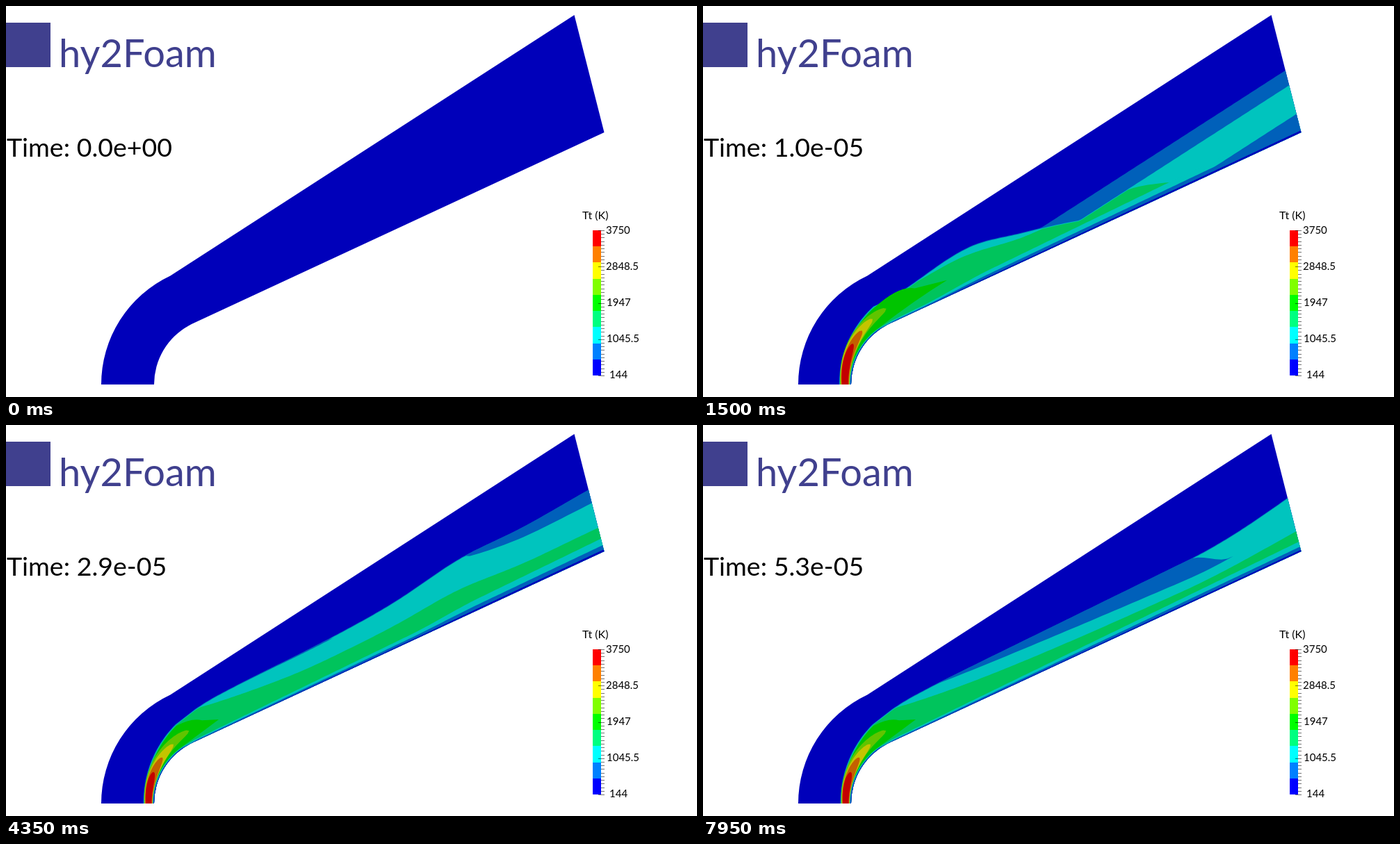
These frames come from a looping animation (994 px wide and 563 px high, 8 s). An HTML page with a canvas:

```html
<!DOCTYPE html>
<html lang="en">
<head>
<meta charset="utf-8">
<title>Flow over a blunt cone</title>
<style>
html, body { margin: 0; width: 100%; height: 100%; overflow: hidden; background: #fff; }
canvas, svg { position: absolute; left: 0; top: 0; width: 994px; height: 563px; }
text { font-family: Lato, "Open Sans", sans-serif; fill: #000; }
</style>
</head>
<body>
<canvas id="field" width="994" height="563"></canvas>
<svg viewBox="0 0 994 563">
  <rect x="0" y="24" width="64" height="64" fill="#40408e"/>
  <text x="76" y="88" font-size="56" style="fill:#40408e">hy2Foam</text>
  <text id="clock" x="1" y="217" font-size="37.5">Time: 0.0e+00</text>
  <text x="829" y="307" font-size="16">Tt (K)</text>
  <g id="legend" font-size="15"></g>
</svg>
<script>
const ctx = document.getElementById('field').getContext('2d');
const clock = document.getElementById('clock');
const STEP = 150, LOOP = 8000;
const DARK = '#0000ba', BLUE = '#0060ba', CYAN = '#00c4be', TEAL = '#00c45c', GREEN = '#00c400';

// Body geometry: concentric nose arcs, then straight flanks
const CX = 310, CY = 545, R_OUT = 173, R_IN = 97;
const rad = d => d * Math.PI / 180;
const polar = (r, deg) => [CX - r * Math.cos(rad(deg)), CY - r * Math.sin(rad(deg))];
const wallY = x => 460 - 0.4657 * (x - 263);
const above = (x, h) => [x, wallY(x) - h];
const mix = (a, b, f) => a + (b - a) * f;
const clamp = v => Math.max(0, Math.min(1, v));
function smooth(v, from, to) {
  const u = clamp((v - from) / (to - from));
  return u * u * (3 - 2 * u);
}

// Contour heights above the flank at step k
function flow(k) {
  const late = Math.max(k, 6) - 6;
  const growth = k < 6 ? 0.7 * k / 6 : mix(0.7, 1, clamp(late / 8));

  // Starting shock: the inflow boundary carried downstream
  const beam = x => wallY(x) - (388 - 0.645 * (x - 236 - 14.4 * k));
  // Slow front that thins the layer behind it
  const front = 465 + 12 * (k - 29);
  const ahead = x => smooth(x, front - 60, front + 200);
  // Wave packet drifting along the layer
  const wave = x => {
    const d = x - 430 - 15 * (k - 14);
    return 10 * Math.cos(d / 38) * Math.exp(-((d / 130) ** 2) - Math.abs(k - 14) / 12);
  };

  const layer = x => growth * (1 - smooth(x, 280 + 25 * late, 340 + 78 * late)) *
    (53 - 8 * Math.exp((263 - x) / 25) + (x - 300) * (0.025 + 0.06 * ahead(x)) + 1.2 * wave(x));
  const outer = x => Math.max(beam(x), layer(x));
  const warm = x => Math.max(beam(x) - 2.5 * k, layer(x) - 1);
  const hot = x => Math.min(warm(x) - 1,
    growth * (1 - smooth(x, 280 + 80 * late, 340 + 100 * late)) *
    (20 + 25 * Math.exp((285 - x) / 150) + 17 * ahead(x) + wave(x)));

  const ripple = 410 + 14 * (k - 14);
  const hotBase = x => 3 + 0.021 * (x - 275) + 5 * smooth(x, ripple - 40, ripple + 60);
  const warmBase = x => Math.max(0.48 * hotBase(x), beam(x) - 7.3 * k);
  const coolBase = x => Math.max(0.14 * hotBase(x), beam(x) - 10.5 * k);
  return { outer, warm, hot, hotBase, warmBase, coolBase };
}

function fill(pts, color) {
  ctx.beginPath();
  pts.forEach(p => ctx.lineTo(...p));
  ctx.closePath();
  ctx.fillStyle = color;
  ctx.fill();
}

function arc(radius, to) {
  const pts = [];
  for (let deg = -5; deg <= to; deg += 2.5) pts.push(polar(radius(deg), deg));
  return pts;
}

// Fills everything on the wall side of a contour
function below(nose, height, color) {
  const pts = [...nose];
  for (let x = 272; x <= 880; x += 4) pts.push(above(x, height(x)));
  fill([...pts, [1500, 700], [pts[0][0], 700]], color);
}

// Cooler tongue that peels off the outer contour towards its tip
function streak(outer, tail, tip, depth, bend) {
  const up = [], down = [];
  for (let n = 0; n <= 50; n++) {
    const u = n / 50, x = mix(tail, tip, u), h = outer(x);
    up.push(above(x, h - depth * smooth(u, 0.85, 1)));
    down.unshift(above(x, h - depth * u ** bend));
  }
  fill([...up, ...down], BLUE);
}

function lens(mid, half, rise, end, color) {
  const up = [], down = [];
  for (let n = -2; n <= 40; n++) {
    const u = n / 40;
    const w = half * (1 + 0.5 * u) * Math.sqrt(1 - u ** 3);
    const r = mid + rise * Math.max(0, u) ** 1.3;
    up.push(polar(r + w, end * u));
    down.unshift(polar(r - w, end * u));
  }
  fill([...up, ...down], color);
}

// Hot green core with a tip that reaches out and draws back
function core(nose, wall, k) {
  const reach = smooth(k, 5, 13) * (1 - smooth(k, 20, 28));
  const tip = mix(306, 372, reach), h = mix(16, 28, reach), mid = mix(258, tip, 0.5);
  const start = nose[nose.length - 1], end = wall[wall.length - 1];
  ctx.beginPath();
  nose.forEach(p => ctx.lineTo(...p));
  ctx.quadraticCurveTo(mix(start[0], mid, 0.6), wallY(mid) - h - 14, ...above(mid, h + 10));
  ctx.lineTo(...above(tip, h));
  ctx.quadraticCurveTo(...above(mid, h - 7), ...end);
  [...wall].reverse().forEach(p => ctx.lineTo(...p));
  ctx.fillStyle = GREEN;
  ctx.fill();
}

// Width share, then rise and end angle early and late
const LENSES = [
  ['#60c400', 0.41, 16, 68, 10, 66],
  ['#c4c400', 0.36, 14, 59, 5, 51],
  ['#c46000', 0.32, 10, 49.5, 3, 38],
  ['#c40000', 0.27, 8, 39, 2.5, 25]
];

function domain() {
  ctx.beginPath();
  ctx.arc(CX, CY, R_OUT, Math.PI, Math.PI + rad(64.8));
  ctx.lineTo(817.5, 13);
  ctx.lineTo(860.5, 182);
  ctx.lineTo(267, 458);
  ctx.arc(CX, CY, R_IN, Math.PI + rad(61), Math.PI, true);
  ctx.closePath();
}

function drawFlow(k) {
  const f = flow(k);
  const settle = clamp((k - 6) / 8);
  const front = Math.max(116 - 3.5 * settle, 174 - 14.4 * k);
  const base = Math.max(R_IN, 174 - 18 * k);
  const depth = front - base;
  const bulge = k < 6 ? 16 * k / 6 : mix(16, 26, settle);
  const shock = inset => arc(
    d => front - inset + bulge * (Math.max(0, d) / 70) ** 1.9, 62);
  const wall = gap => arc(() => base + gap, 55);

  below(shock(0), f.outer, BLUE);
  below(shock(0.7), f.warm, CYAN);
  if (k > 10 && k < 32)
    streak(f.outer, 435 + 15 * (k - 14), 560 + 30 * (k - 14),
      Math.min(18, 4.5 * (k - 10)) + 0.8 * Math.max(0, k - 14), 0.5);
  if (k > 27)
    streak(f.outer, 335, 475 + 12 * (k - 29), 1.2 * (k - 27), 0.8);
  below(shock(1.5), f.hot, TEAL);

  core(shock(2.5), wall(2.6), k);
  for (const [color, share, r0, e0, r1, e1] of LENSES)
    lens(base + depth / 2, depth * share, mix(r0, r1, settle), mix(e0, e1, settle), color);

  below(wall(2), f.hotBase, CYAN);
  below(wall(1.2), f.warmBase, BLUE);
  below(wall(0.5), f.coolBase, DARK);
}

function draw(k) {
  ctx.clearRect(0, 0, 994, 563);
  ctx.save();
  domain();
  ctx.fillStyle = DARK;
  ctx.fill();
  ctx.clip();
  if (k > 0) drawFlow(k);
  ctx.restore();
}

function buildLegend() {
  const top = 323, height = 209;
  const colors = ['#f00', '#ff8000', '#ff0', '#80ff00', '#0f0', '#00ff80', '#0ff', '#0080ff', '#00f'];
  const labels = [['3750', 863], ['2848.5', 863], ['1947', 864], ['1045.5', 864], ['144', 868]];
  let out = '';
  colors.forEach((c, i) => {
    const y = Math.round(top + i * height / 9), end = Math.round(top + (i + 1) * height / 9);
    out += `<rect x="844" y="${y}" width="12" height="${end - y}" fill="${c}"/>`;
  });
  for (let i = 0; i <= 40; i++) {
    const y = Math.round(top + i * height / 40) + 0.5, x = i % 10 ? 856 : 852;
    out += `<path d="M${x} ${y}H861" stroke="#000" stroke-opacity=".55"/>`;
  }
  labels.forEach(([s, x], i) => {
    out += `<text x="${x}" y="${328 + i * 52.1}">${s}</text>`;
  });
  document.getElementById('legend').innerHTML = out;
}

function stamp(k) {
  const [m, e] = (k * 1e-6).toExponential(1).split('e');
  return `Time: ${m}e${e[0]}${e.slice(1).padStart(2, '0')}`;
}

let shown = -1;
function tick() {
  const k = Math.floor(performance.now() % LOOP / STEP);
  if (k !== shown) {
    shown = k;
    draw(k);
    clock.textContent = stamp(k);
  }
  requestAnimationFrame(tick);
}
buildLegend();
tick();
</script>
</body>
</html>
```
